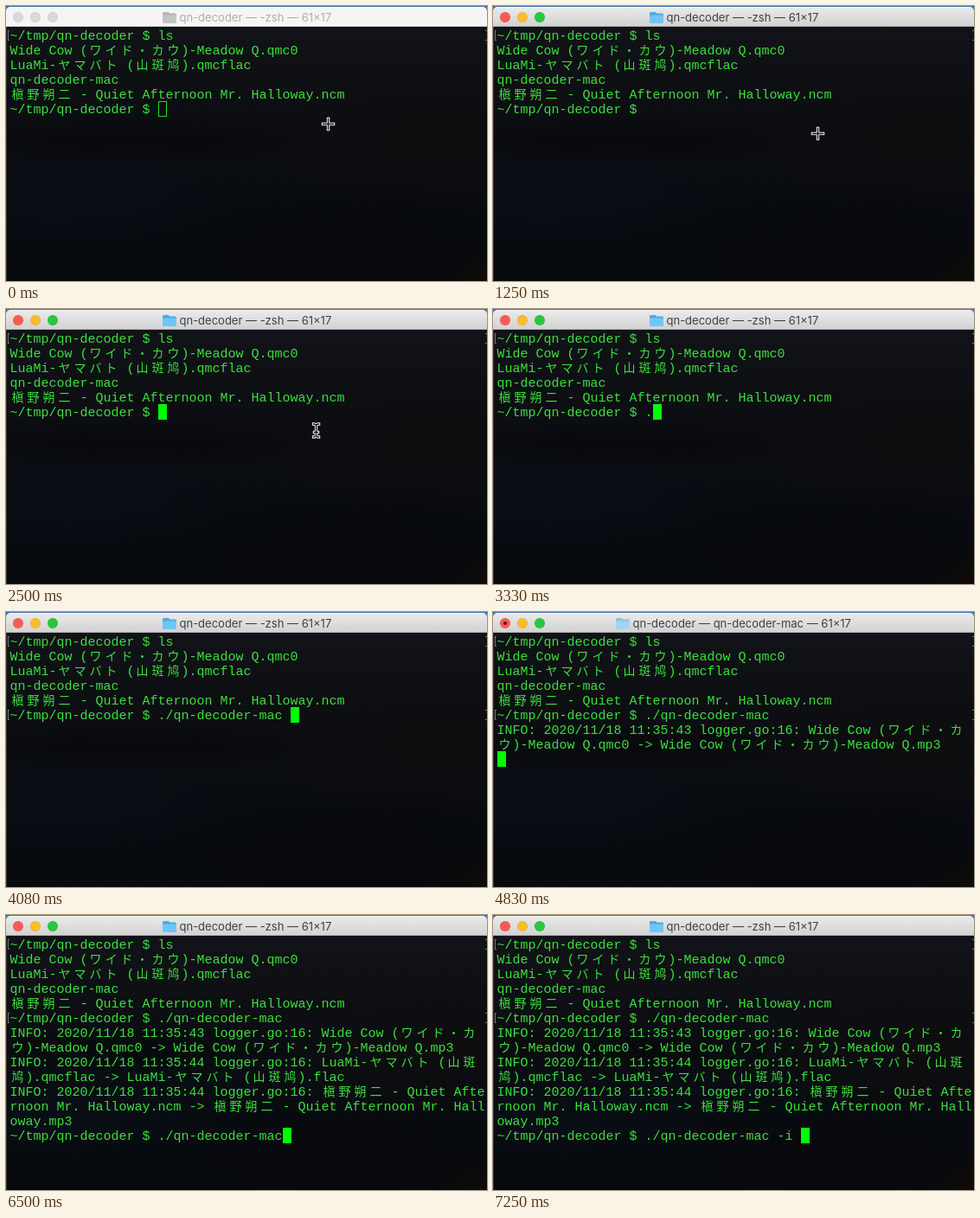
An HTML page with a canvas for the animation above (8 s loop, 556 px wide and 318 px high).

```html
<!DOCTYPE html>
<html lang="en">
<head>
<meta charset="utf-8">
<title>Terminal session</title>
<style>
  html, body { margin: 0; width: 100%; height: 100%; overflow: hidden; background: #090c11; }
  canvas { display: block; }
</style>
</head>
<body>
<canvas id="stage" width="556" height="318"></canvas>
<script>
const ctx = document.getElementById('stage').getContext('2d');
const W = 556, H = 318, LOOP = 8000;
const CELL = 9, ROW = 17, LEFT = 5, TOP = 25, COLUMNS = 61;
const GREEN = '#3ce03c';

const PROMPT = '~/tmp/qn-decoder $ ';
const SONG_A = 'Wide Cow (ワイド・カウ)-Meadow Q';
const SONG_B = 'LuaMi-ヤマバト (山斑鸠)';
const SONG_C = '槇野朔二 - Quiet Afternoon Mr. Halloway';
const LISTING = [PROMPT + 'ls', SONG_A + '.qmc0', SONG_B + '.qmcflac', 'qn-decoder-mac', SONG_C + '.ncm'];
const log = (second, song, from, to) =>
  `INFO: 2020/11/18 11:35:${second} logger.go:16: ${song}.${from} -> ${song}.${to}`;
const LOGS = [
  [4830, log(43, SONG_A, 'qmc0', 'mp3')],
  [5000, log(44, SONG_B, 'qmcflac', 'flac')],
  [5170, log(44, SONG_C, 'ncm', 'mp3')]
];

const FIRST_COMMAND = [[0, ''], [3330, '.'], [3420, './'], [3670, './q'], [3750, './qn'], [3920, './qn-decoder-mac ']];
const SECOND_COMMAND = [[0, ''], [6500, './qn-decoder-mac'], [6750, './qn-decoder-mac '],
  [6830, './qn-decoder-mac -'], [7000, './qn-decoder-mac -i'], [7250, './qn-decoder-mac -i ']];
const CARET = [[0, 'outline'], [1250, 'off'], [2500, 'block'], [3000, 'off'], [3330, 'block'], [6000, 'off'], [6500, 'block']];
const POINTER = [[0, ['cross', 372, 136]], [500, ['cross', 376, 144]], [1170, ['cross', 375, 147]],
  [1330, ['beam', 368, 146]], [1420, ['beam', 361, 143]], [1500, ['beam', 358, 140]], [3330, null]];

const at = (steps, t) => steps.filter(([start]) => start <= t).pop()[1];

function rect(color, x, y, w, h) {
  ctx.fillStyle = color;
  ctx.fillRect(x, y, w, h);
}

function disc(color, x, y, r) {
  ctx.fillStyle = color;
  ctx.beginPath();
  ctx.arc(x, y, r, 0, Math.PI * 2);
  ctx.fill();
}

function glow(x, y, rx, ry, rgb, alpha) {
  ctx.save();
  ctx.translate(x, y);
  ctx.scale(rx, ry);
  const fill = ctx.createRadialGradient(0, 0, 0, 0, 0, 1);
  fill.addColorStop(0, `rgba(${rgb},${alpha})`);
  fill.addColorStop(1, `rgba(${rgb},0)`);
  ctx.fillStyle = fill;
  ctx.fillRect(-1, -1, 2, 2);
  ctx.restore();
}

function verticalGradient(y0, y1, ...colors) {
  const fill = ctx.createLinearGradient(0, y0, 0, y1);
  colors.forEach((color, i) => fill.addColorStop(i / (colors.length - 1), color));
  return fill;
}

function drawBackground() {
  rect(verticalGradient(24, H, '#111318', '#0d0f13', '#0a0d12', '#080c11', '#06090e'), 0, 0, W, H);
  glow(150, 155, 240, 32, '5,6,8', 0.6);
  glow(500, 160, 190, 85, '16,13,11', 0.6);
  glow(400, 265, 230, 65, '5,6,8', 0.6);
  glow(60, 225, 220, 60, '9,16,24', 0.5);
  glow(W, H, 70, 50, '17,13,8', 0.8);
  rect('#34383c', 0, 24, 1, H - 24);
}

function drawFolder(x, y, color, tab) {
  ctx.fillStyle = tab;
  ctx.beginPath();
  ctx.roundRect(x, y, 8, 5, 1.5);
  ctx.roundRect(x, y + 1.5, 16, 10, 1.5);
  ctx.fill();
  ctx.fillStyle = color;
  ctx.beginPath();
  ctx.roundRect(x, y + 3.5, 16, 9.5, 1.5);
  ctx.fill();
}

function drawTitleBar(t) {
  const focused = t >= 1250;
  const running = t >= 4750 && t < 5170;
  rect('#3f74a8', 0, 0, W, 8);
  ctx.fillStyle = focused ? verticalGradient(1, 24, '#ebebeb', '#d1d1d1') : '#f5f5f5';
  ctx.beginPath();
  ctx.roundRect(0, 1, W, 23, [5, 5, 0, 0]);
  ctx.fill();
  rect('#f7f7f7', 4, 1, W - 8, 1);
  rect(focused ? '#b0b0b0' : '#d5d5d5', 0, 23, W, 1);

  const lights = focused
    ? [['#fc5b55', '#ee514b'], ['#fdbb2e', '#eeae29'], ['#2bc640', '#23b936']]
    : Array(3).fill(['#d9d9d9', '#cccccc']);
  lights.forEach(([fill, rim], i) => {
    disc(rim, 14 + 20 * i, 13, 6);
    disc(fill, 14 + 20 * i, 13, 5.3);
  });
  if (running) disc('#6e0906', 14, 13, 2);

  const title = `qn-decoder — ${running ? 'qn-decoder-mac' : '-zsh'} — 61×17`;
  ctx.font = '13px Inter, Roboto, sans-serif';
  ctx.textAlign = 'left';
  const x = Math.round(278.5 - (ctx.measureText(title).width + 20) / 2);
  if (!focused) drawFolder(x, 7, '#c4c4c4', '#b5b5b5');
  else if (running && t < 4920) drawFolder(x, 7, '#a3d5f1', '#8bc4e4');
  else drawFolder(x, 7, '#6fc6f5', '#4bacdf');
  ctx.fillStyle = focused ? '#404040' : '#adadad';
  ctx.fillText(title, x + 19.5, 18);
}

// Draws a line on the character grid, wrapping it, and returns the cell after its end.
function drawLine(text, row) {
  let col = 0;
  ctx.fillStyle = GREEN;
  ctx.textAlign = 'center';
  for (const char of text) {
    const wide = char.codePointAt(0) > 0x2e80;
    const span = wide ? 2 : 1;
    if (col + span > COLUMNS) {
      col = 0;
      row++;
    }
    ctx.font = wide
      ? '300 14px "Noto Sans CJK JP", "Noto Sans CJK SC", "Noto Sans CJK", sans-serif'
      : '15px "Liberation Mono", "DejaVu Sans Mono", monospace';
    ctx.fillText(char, LEFT - 0.5 + (col + span / 2) * CELL, TOP + row * ROW + 14);
    col += span;
  }
  return { col, row };
}

function drawMark(row) {
  const y = TOP + row * ROW + 3;
  rect('#66806a', 2, y, 1, 12);
  for (const x of [2, 554]) {
    rect('#66806a', x, y, 2, 1);
    rect('#66806a', x, y + 11, 2, 1);
  }
}

function drawCaret({ col, row }, style) {
  const x = LEFT + col * CELL, y = TOP + row * ROW;
  if (style === 'block') rect('#00ff00', x, y, CELL + 1, ROW + 1);
  if (style === 'outline') {
    ctx.strokeStyle = '#20e020';
    ctx.lineWidth = 1;
    ctx.strokeRect(x + 0.5, y + 0.5, CELL, ROW);
  }
}

function drawTerminal(t) {
  const lines = [...LISTING, PROMPT + at(FIRST_COMMAND, t)];
  LOGS.forEach(([start, line]) => { if (t >= start) lines.push(line); });
  if (t >= 5170) lines.push(PROMPT + at(SECOND_COMMAND, t));
  else if (t >= 4750) lines.push('');

  let end, row = 0;
  for (const line of lines) {
    end = drawLine(line, row);
    row = end.row + 1;
  }
  drawMark(0);
  if (t >= 4080) drawMark(5);
  drawCaret(end, at(CARET, t));
}

function drawPointer(t) {
  const pointer = at(POINTER, t);
  if (!pointer) return;
  const [kind, x, y] = pointer;
  const shape = new Path2D(kind === 'cross'
    ? 'M-6 0H6M0 -6V6'
    : 'M-3 -7.5Q0 -7.5 0 -5Q0 -7.5 3 -7.5M0 -5V5M-3 7.5Q0 7.5 0 5Q0 7.5 3 7.5M-2 2H2');
  ctx.save();
  ctx.translate(x + 0.5, y + 0.5);
  ctx.lineCap = 'square';
  for (const [color, width] of [['#f4f4f4', 3.4], ['#101010', 1.3]]) {
    ctx.strokeStyle = color;
    ctx.lineWidth = width;
    ctx.stroke(shape);
  }
  ctx.restore();
}

function frame() {
  const t = performance.now() % LOOP;
  drawBackground();
  drawTitleBar(t);
  drawTerminal(t);
  drawPointer(t);
  requestAnimationFrame(frame);
}
frame();
</script>
</body>
</html>
```
